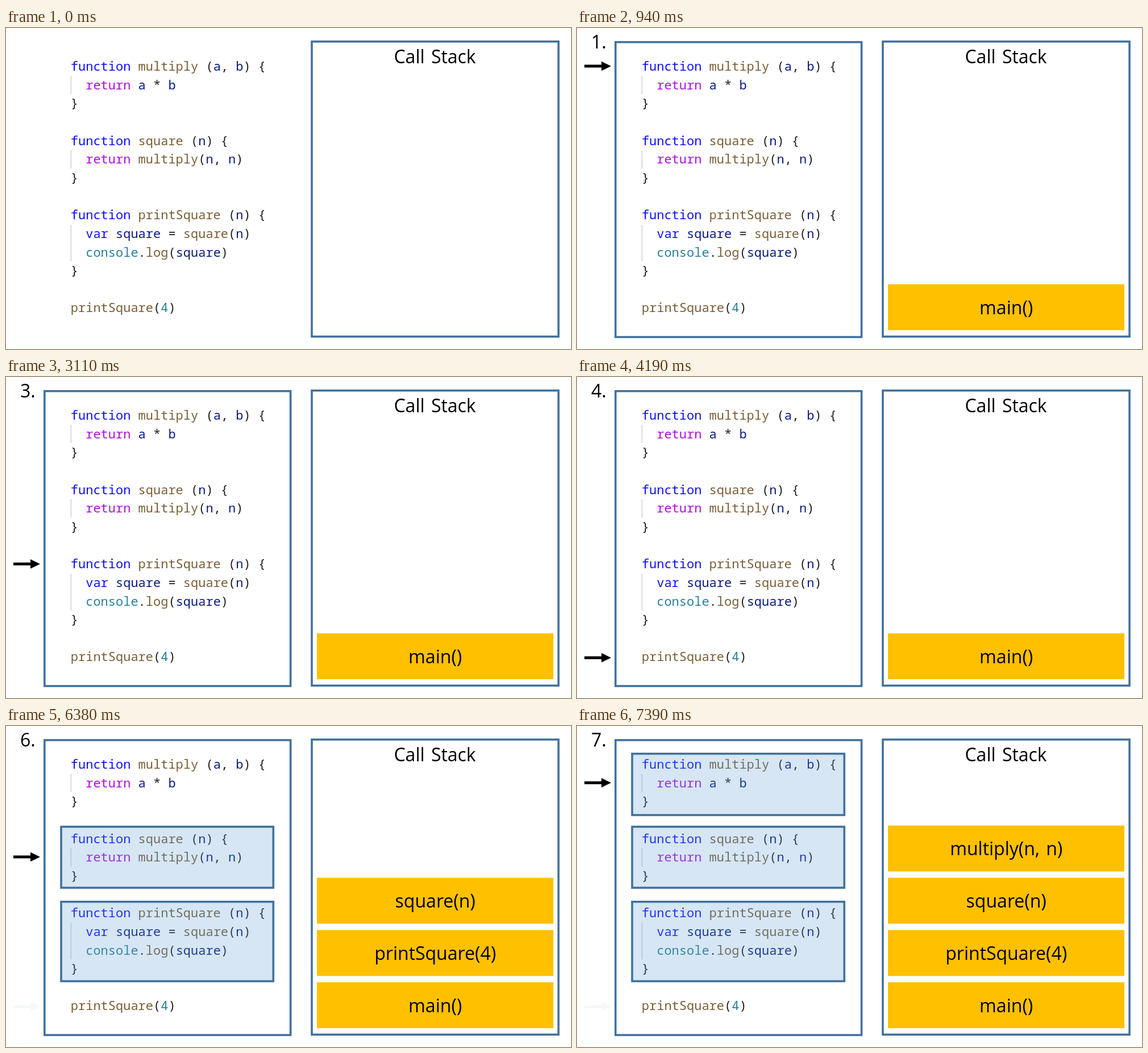
Animation of 994 by 564 pixels, one loop 8000 ms. Source, as an HTML page:

```html
<!DOCTYPE html>
<html lang="en">
<head>
<meta charset="utf-8">
<style>
  html, body { margin: 0; width: 100%; height: 100%; overflow: hidden; background: #fff; }
  svg { display: block; width: 994px; height: 564px; }
  text { white-space: pre; }
  .code { font: 22px "Noto Sans Mono", monospace; }
  .label { font: 32px "Open Sans", "Noto Sans", sans-serif; word-spacing: 3px; }
  .mid { text-anchor: middle; }
  .frame { fill: none; stroke: #41719c; stroke-width: 3.6; }
  .glow { fill: #5b9bd5; fill-opacity: .25; }
  .guide { fill: #d3d3d3; }
</style>
</head>
<body>
<svg viewBox="0 0 994 564"></svg>
<script>
const svg = document.querySelector("svg");
const LOOP = 8000;

// Each step: start time, arrow height, number of calls on the stack
const steps = [
  [0, null, 0],
  [940, 67, 1],
  [2100, 198.5, 1],
  [3110, 328.5, 1],
  [4190, 493.3, 1],
  [5280, 361.8, 2],
  [6380, 230, 3],
  [7390, 99.8, 4]
];

const code = `function multiply (a, b) {
  return a * b
}

function square (n) {
  return multiply(n, n)
}

function printSquare (n) {
  var square = square(n)
  console.log(square)
}

printSquare(4)`.split("\n");

const calls = ["main()", "printSquare(4)", "square(n)", "multiply(n, n)"];
// Top and bottom of the highlight belonging to each call
const glows = [null, [308.8, 448.4], [177, 284.2], [48.7, 156.5]];

function add(tag, attrs, parent = svg, content = "") {
  const el = document.createElementNS("http://www.w3.org/2000/svg", tag);
  for (const key in attrs) el.setAttribute(key, attrs[key]);
  el.textContent = content;
  return parent.appendChild(el);
}

function rect(x, y, right, bottom, attrs, parent) {
  return add("rect", { x, y, width: right - x, height: bottom - y, ...attrs }, parent);
}

function label(x, y, content, cls = "label mid", parent = svg) {
  return add("text", { x, y, class: cls }, parent, content);
}

function colour(token, rest) {
  if (/^(function|var)$/.test(token)) return "#1010ff";
  if (token === "return") return "#af10db";
  if (token === "console" || /^\d/.test(token)) return "#267f99";
  if (!/^\w/.test(token)) return "#1e1e1e";
  return /^ ?\(/.test(rest) ? "#795e36" : "#0a1a80";
}

function arrow(fill) {
  return add("path", { d: "M13-2.5H43V-8.3L60 0L43 8.3V2.5H13Z", fill });
}

const moveTo = (el, y) => el.setAttribute("transform", `translate(0 ${y})`);
const show = (el, on) => el.setAttribute("visibility", on ? "visible" : "hidden");

for (const [top, bottom] of [[84, 116], [215, 247], [346, 410]])
  rect(113.6, top, 115.2, bottom, { class: "guide" });

code.forEach((line, i) => {
  const row = label(113.8, 75 + i * 32.65, "", "code");
  for (const m of line.matchAll(/\w+|\W+/g))
    add("tspan", { fill: colour(m[0], line.slice(m.index + m[0].length)) }, row, m[0]);
});

rect(538, 23.8, 972, 542.2, { class: "frame" });
label(754.5, 62, "Call Stack");

const codeFrame = rect(67.8, 24.8, 500.6, 543, { class: "frame" });

const groups = calls.map((name, i) => {
  const g = add("g", {});
  const top = 450.3 - i * 91.8;
  rect(547, top, 963, top + 80.7, { fill: "#ffc000" }, g);
  label(755.2, top + 52.5, name, "label mid", g);
  if (glows[i]) rect(97, glows[i][0], 470.3, glows[i][1], { class: "frame glow" }, g);
  return g;
});

const trace = arrow("#f4f9fe");
moveTo(trace, 493.3);
const pointer = arrow("#000");
const number = label(25, 36, "", "label");

function draw(now) {
  const t = now % LOOP;
  const n = steps.findLastIndex(([start]) => t >= start);
  const [, y, depth] = steps[n];
  show(codeFrame, n > 0);
  show(pointer, n > 0);
  show(trace, n > 4);
  groups.forEach((g, i) => show(g, i < depth));
  if (n) moveTo(pointer, y);
  number.textContent = n ? n + "." : "";
}

let origin;
function tick(now) {
  origin ??= now;
  draw(now - origin);
  requestAnimationFrame(tick);
}
draw(0);
requestAnimationFrame(tick);
</script>
</body>
</html>
```
